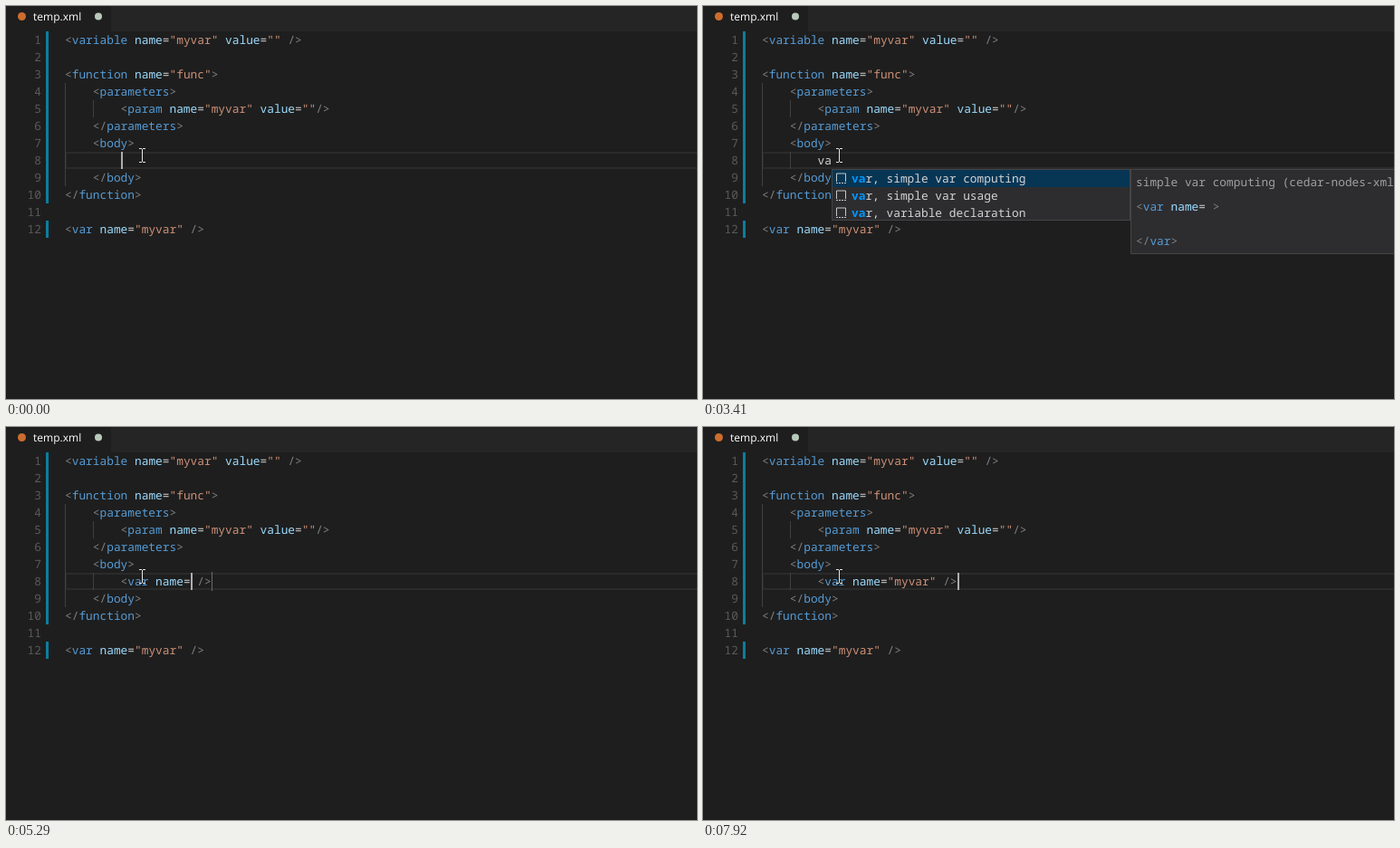
Animation, 763 px wide and 434 px high, one loop 8 s. Source, as an HTML page:

```html
<!DOCTYPE html>
<html lang="en">
<head>
<meta charset="utf-8">
<title>Editor completion</title>
<style>
  html, body { margin: 0; width: 100%; height: 100%; overflow: hidden; background: #1e1e1e; }
  svg { display: block; width: 763px; height: 434px; }
  text {
    font: 12.83px "Noto Sans Mono", "DejaVu Sans Mono", monospace;
    white-space: pre; text-rendering: geometricPrecision; fill: #d4d4d4;
  }
  text.title { font: 12px "Open Sans", "Noto Sans", sans-serif; fill: #fff; }
  .num { fill: #5a5a5a; text-anchor: end; }
  .punct { fill: #808080; }
  .tag { fill: #569cd6; }
  .attr { fill: #9cdcfe; }
  .str { fill: #ce9178; }
  .match { fill: #0097fb; font-weight: bold; }
  .note { fill: #a0a0a0; }
  .guide { fill: #404040; }
  .git { fill: #0c7d9d; }
  .caret { fill: #aeafad; }
  .stop { fill: #6a6a6a; }
  .box { fill: #2d2d30; stroke: #454545; }
  .chosen { fill: #073655; }
  .icon { fill: none; stroke: #c5c5c5; }
</style>
</head>
<body>
<svg id="stage" viewBox="0 0 763 434"></svg>
<script>
const LOOP = 8000, CHAR = 7.698, LEFT = 65, LINE = 19, TOP = 28;
const stage = document.getElementById('stage');
const timed = [];

function add(parent, name, attrs, content) {
  const el = document.createElementNS('http://www.w3.org/2000/svg', name);
  for (const key in attrs) el.setAttribute(key, attrs[key]);
  if (content) el.textContent = content;
  return parent.appendChild(el);
}
const rect = (parent, x, y, width, height, look) =>
  add(parent, 'rect', { x, y, width, height, ...(look[0] === '#' ? { fill: look } : { class: look }) });
const label = (parent, x, y, content, look = '') => add(parent, 'text', { x, y, class: look }, content);
const col = n => LEFT + n * CHAR;
const lineTop = n => TOP + (n - 1) * LINE;

// A group shown only during the given [start, end) spans.
function during(...spans) {
  const el = add(stage, 'g', {});
  timed.push({ el, spans });
  return el;
}

function code(parent, x, y, source) {
  const row = label(parent, x, y, '');
  let afterOpen = false;
  for (const [part] of source.matchAll(/"[^"]*"|<\/?|\/?>|\w+|=|\s+/g)) {
    const look = part[0] === '"' ? 'str'
      : /[<>]/.test(part) ? 'punct'
      : /\w/.test(part) ? (afterOpen ? 'tag' : 'attr') : '';
    afterOpen = part[0] === '<';
    add(row, 'tspan', { class: look }, part);
  }
}
const codeLine = (parent, n, indent, source) => code(parent, col(indent), lineTop(n) + 14, source);

function drawEditor() {
  rect(stage, 0, 0, 763, 28, '#252526');
  rect(stage, 0, 0, 116, 28, '#1e1e1e');
  add(stage, 'circle', { cx: 17.5, cy: 11.5, r: 4.5, fill: '#cc6d2e' });
  label(stage, 30, 16, 'temp.xml', 'title');
  add(stage, 'circle', { cx: 102, cy: 11.5, r: 4, fill: '#b8c9bb' });

  add(stage, 'rect', { x: 66, y: 162, width: 720, height: 17, fill: 'none', stroke: '#2b2b2b', 'stroke-width': 2 });
  rect(stage, 44, 28, 3, 190, 'git');
  rect(stage, 44, 237, 3, 19, 'git');
  rect(stage, 65, 85, 1, 114, 'guide');
  rect(stage, 96, 104, 1, 19, 'guide');

  const lines = [
    [0, '<variable name="myvar" value="" />'], [0, ''],
    [0, '<function name="func">'],
    [4, '<parameters>'],
    [8, '<param name="myvar" value=""/>'],
    [4, '</parameters>'],
    [4, '<body>'], [0, ''],
    [4, '</body>'],
    [0, '</function>'], [0, ''],
    [0, '<var name="myvar" />']
  ];
  lines.forEach(([indent, source], i) => {
    label(stage, 39, lineTop(i + 1) + 14, i + 1, 'num');
    if (source) codeLine(stage, i + 1, indent, source);
  });
}

function drawTyping() {
  const plain = (content, ...span) => label(during(span), col(8), lineTop(8) + 14, content);
  const tagged = (source, ...span) => codeLine(during(span), 8, 8, source);
  const caret = (x, ...spans) => rect(during(...spans), x, 161, 2, 19, 'caret');
  const stop = (x, ...span) => rect(during(span), x, 160, 1, 21, 'stop');

  rect(during([2910, LOOP]), 96, 161, 1, 19, 'guide');
  rect(during([5800, 6050]), 204, 161, 15, 19, '#3f3f3f');

  plain('v', 2910, 3410);
  plain('va', 3410, 4420);
  plain('<var name= />', 4420, 4540);
  tagged('<var name= />', 4540, 5800);
  tagged('<var name="" />', 5800, 6790);
  tagged('<var name="myvar" />', 6790, LOOP);

  stop(227, 4420, 5800);
  stop(242, 5800, 6790);
  stop(281, 6790, 7920);

  caret(127, [0, 150], [530, 1030], [1530, 2030]);
  caret(134, [2910, 3410]);
  caret(142, [3540, 4040]);
  caret(204, [4420, 4790], [5290, 5800]);
  caret(211, [5800, 6790]);
  caret(250, [6790, 7170], [7670, 7920]);
  caret(281, [7920, LOOP]);
}

function drawSnippetList() {
  const list = during([3410, 4420]);
  rect(list, 142.5, 180.5, 329, 56, 'box');
  const first = during([3410, 3920]), second = during([3920, 4420]);
  rect(first, 143, 181, 328, 19, 'chosen');
  rect(second, 143, 200, 328, 19, 'chosen');

  const rows = during([3410, 4420]);
  ['simple var computing', 'simple var usage', 'variable declaration'].forEach((name, i) => {
    const y = 181 + i * LINE;
    add(rows, 'path', { class: 'icon', d: `M147.5 ${y + 13}v-9h10v9` });
    add(rows, 'path', { class: 'icon', d: `M147 ${y + 14.5}h11`, 'stroke-dasharray': '2 1' });
    const row = label(rows, 164, y + 14, '');
    add(row, 'tspan', { class: 'match' }, 'va');
    add(row, 'tspan', {}, 'r, ' + name);
  });

  const details = (parent, height, note) => {
    rect(parent, 472.5, 180.5, 330, height, 'box');
    label(parent, 478, 199, note, 'note');
  };
  details(first, 93, 'simple var computing (cedar-nodes-xml)');
  code(first, 478, 226, '<var name= >');
  code(first, 478, 264, '</var>');
  details(second, 56, 'simple var usage (cedar-nodes-xml)');
  code(second, 478, 226, '<var name= />');
}

function drawValueList() {
  const list = during([5920, 6790]);
  rect(list, 211.5, 180.5, 329, 18, 'box');
  rect(list, 212, 181, 328, 17, 'chosen');
  add(list, 'path', { class: 'icon', d: 'M218 186.5h-2.5v7h2.5M225 186.5h2.5v7h-2.5' });
  add(list, 'path', { fill: '#75beff', d: 'M218 188l4-2 3 1.5v3.5l-4 2-3-1.5z' });
  label(list, 233, 195, 'myvar');
}

function drawPointer() {
  add(stage, 'path', {
    fill: 'none', stroke: '#e4e4e4',
    d: 'M147 157.5h3M151 157.5h3M150.5 158v14M147 172.5h3M151 172.5h3'
  });
}

drawEditor();
drawTyping();
drawSnippetList();
drawValueList();
drawPointer();

const start = performance.now();
function render() {
  const t = (performance.now() - start) % LOOP;
  for (const { el, spans } of timed) {
    const on = spans.some(([from, to]) => t >= from && t < to);
    el.style.display = on ? '' : 'none';
  }
  requestAnimationFrame(render);
}
render();
</script>
</body>
</html>
```
